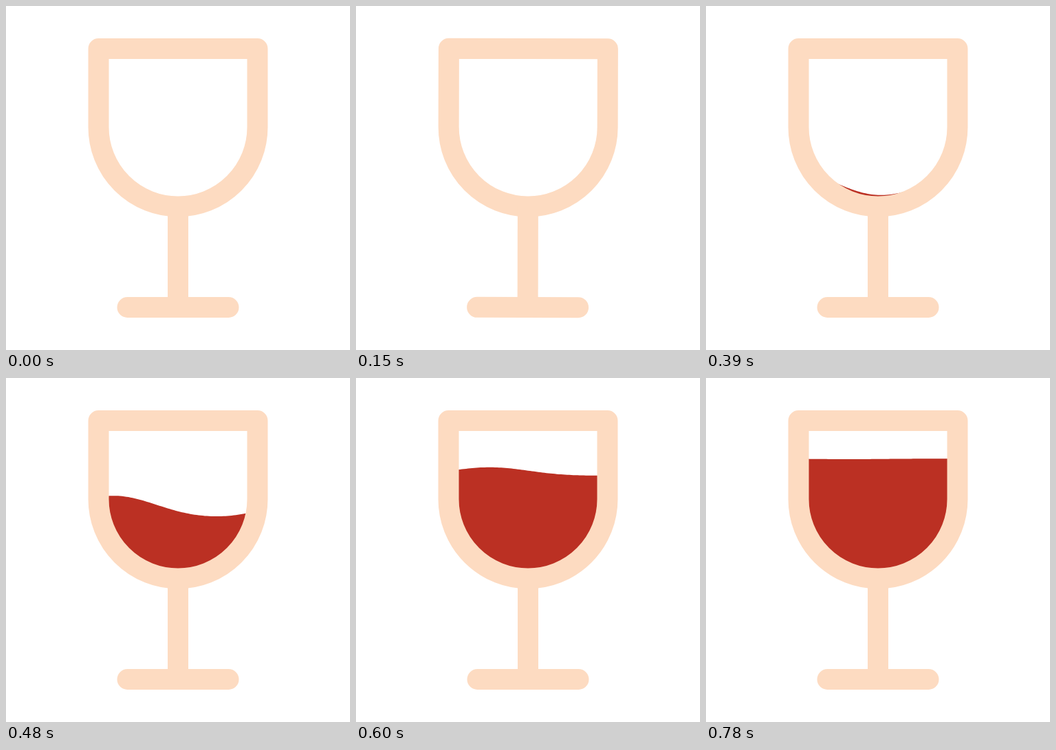
An HTML page that plays this animation: 500x500 px, repeating every 1.83 s.

```html
<!DOCTYPE html>
<html lang="en">
<head>
<meta charset="utf-8">
<title>Glass filling with wine</title>
<style>
  html, body { margin: 0; width: 100%; height: 100%; overflow: hidden; background: #fff; }
  svg { display: block; width: 100%; height: 100%; }
</style>
</head>
<body>
<svg viewBox="0 0 500 500">
  <defs>
    <path id="bowl" d="M134.5 62H365.5V176A115.5 115.5 0 0 1 134.5 176Z"/>
    <clipPath id="inside"><use href="#bowl"/></clipPath>
  </defs>
  <path id="wine" fill="#bb3023" clip-path="url(#inside)"/>
  <g id="glass" fill="none" stroke="#fddbc1" stroke-width="30" stroke-linejoin="round">
    <use href="#bowl"/>
    <path d="M250 291V438"/>
    <path d="M176.5 438H323.5" stroke-linecap="round"/>
  </g>
</svg>
<script>
const LOOP = 1830, STEP = 30, LAST = 26, POUR = 13;
const SWINGS = [0, -3, 3, 0], SWING_START = 0.46, SWING_LENGTH = 3;
const glass = document.getElementById('glass');
const wine = document.getElementById('wine');

const smooth = t => t * t * (3 - 2 * t);

function tilt(step) {
  const pos = Math.min(Math.max((step - SWING_START) / SWING_LENGTH, 0), SWINGS.length - 1);
  const i = Math.min(Math.floor(pos), SWINGS.length - 2);
  return SWINGS[i] + (SWINGS[i + 1] - SWINGS[i]) * smooth(pos - i);
}

// Wine surface: a rising wave that drifts right while it calms down.
function winePath(step) {
  if (step < POUR) return '';
  const rest = ((LAST - step) / (LAST - POUR)) ** 2.6;
  const level = 117.6 + 135.5 * rest;
  const trough = 358 - 103 * rest;
  const height = Math.max(-0.4, 2.25 * (22.65 - step));
  const sharpness = 0.28 * (1 - rest);
  let d = 'M130 300';
  for (let x = 130; x <= 370; x += 3) {
    const a = (x - trough) * Math.PI / 150;
    const y = level + height * (Math.cos(a) + sharpness * Math.sin(a) ** 2);
    d += `L${x} ${y.toFixed(2)}`;
  }
  return d + 'V300Z';
}

function draw() {
  const step = Math.min(Math.floor(performance.now() % LOOP / STEP), LAST);
  glass.setAttribute('transform', `rotate(${tilt(step)} 250 250)`);
  wine.setAttribute('d', winePath(step));
  requestAnimationFrame(draw);
}
draw();
</script>
</body>
</html>
```
